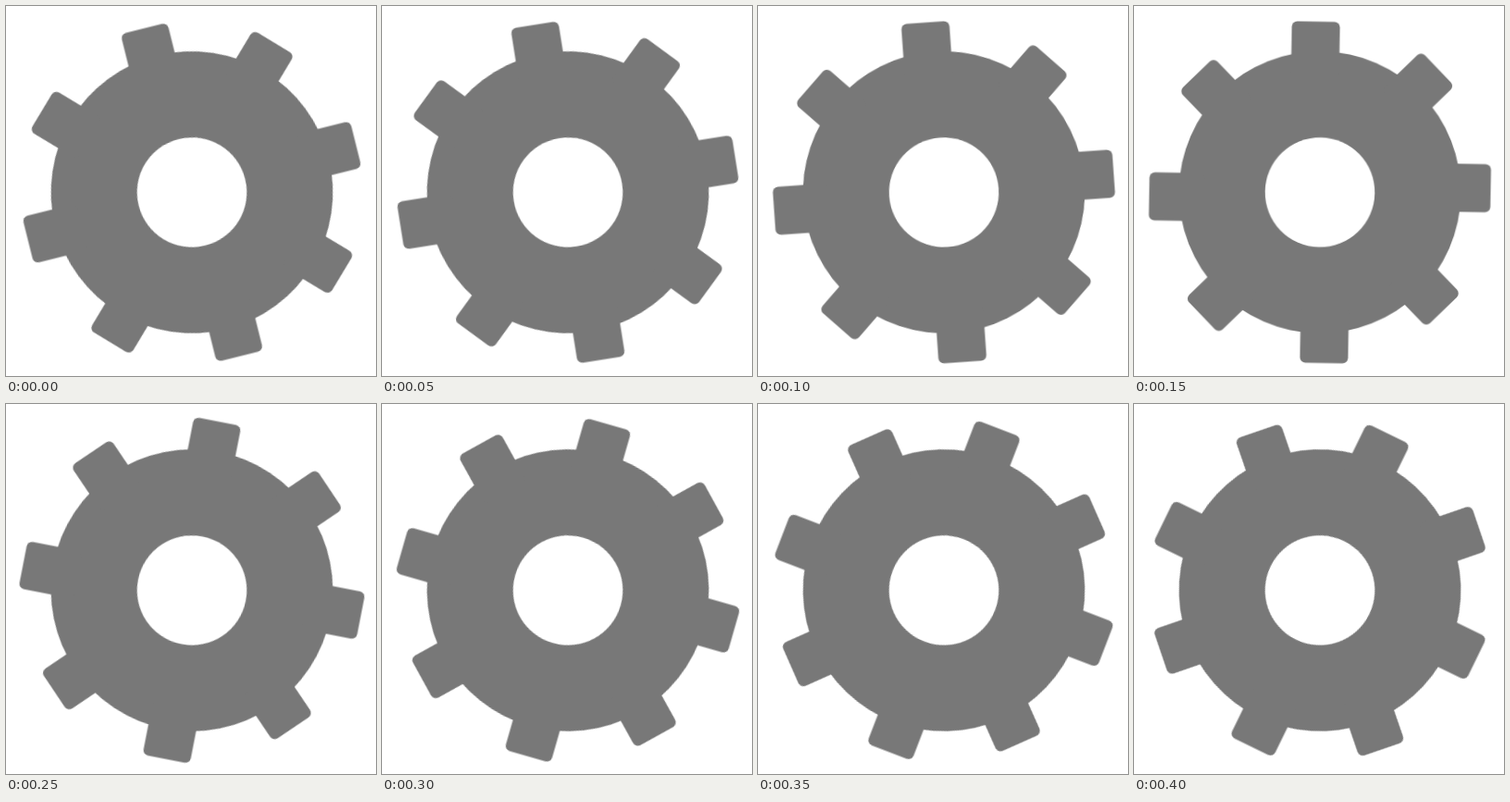
Animation, 400 px wide and 400 px high, one loop 0.55 s. Source, as an HTML page:

```html
<!DOCTYPE html>
<html lang="en">
<head>
<meta charset="utf-8">
<title>Turning gear</title>
<style>
  html, body { margin: 0; width: 100%; height: 100%; overflow: hidden; background: #fff; }
  svg { display: block; width: 100vw; height: 100vh; }
  #gear { fill: #787878; transform-origin: 0 0; }
</style>
</head>
<body>
<svg viewBox="0 0 400 400">
  <g transform="translate(201 201.4)">
    <g id="gear">
      <circle r="152.4"/>
      <circle r="59.3" fill="#fff"/>
    </g>
  </g>
</svg>
<script>
  const LOOP = 550, STEP_TIME = 50, STEPS = 9;
  const TEETH = 8, START_ANGLE = -14, STEP_ANGLE = 5;
  const gear = document.getElementById('gear');

  // Each tooth sits slightly to one side of its spoke.
  const tooth = { x: -33.5, y: -184.5, width: 52, height: 60, rx: 6 };
  for (let i = 0; i < TEETH; i++) {
    const rect = document.createElementNS(gear.namespaceURI, 'rect');
    for (const [name, value] of Object.entries(tooth)) rect.setAttribute(name, value);
    rect.setAttribute('transform', `rotate(${i * 360 / TEETH})`);
    gear.append(rect);
  }

  const pose = step => `rotate(${START_ANGLE + step * STEP_ANGLE}deg)`;
  const frames = Array.from({ length: STEPS }, (_, step) => ({
    offset: step * STEP_TIME / LOOP, transform: pose(step), easing: 'step-end'
  }));
  // The last pose is held until the loop restarts.
  frames.push({ offset: 1, transform: pose(STEPS - 1) });
  gear.animate(frames, { duration: LOOP, iterations: Infinity });
</script>
</body>
</html>
```
